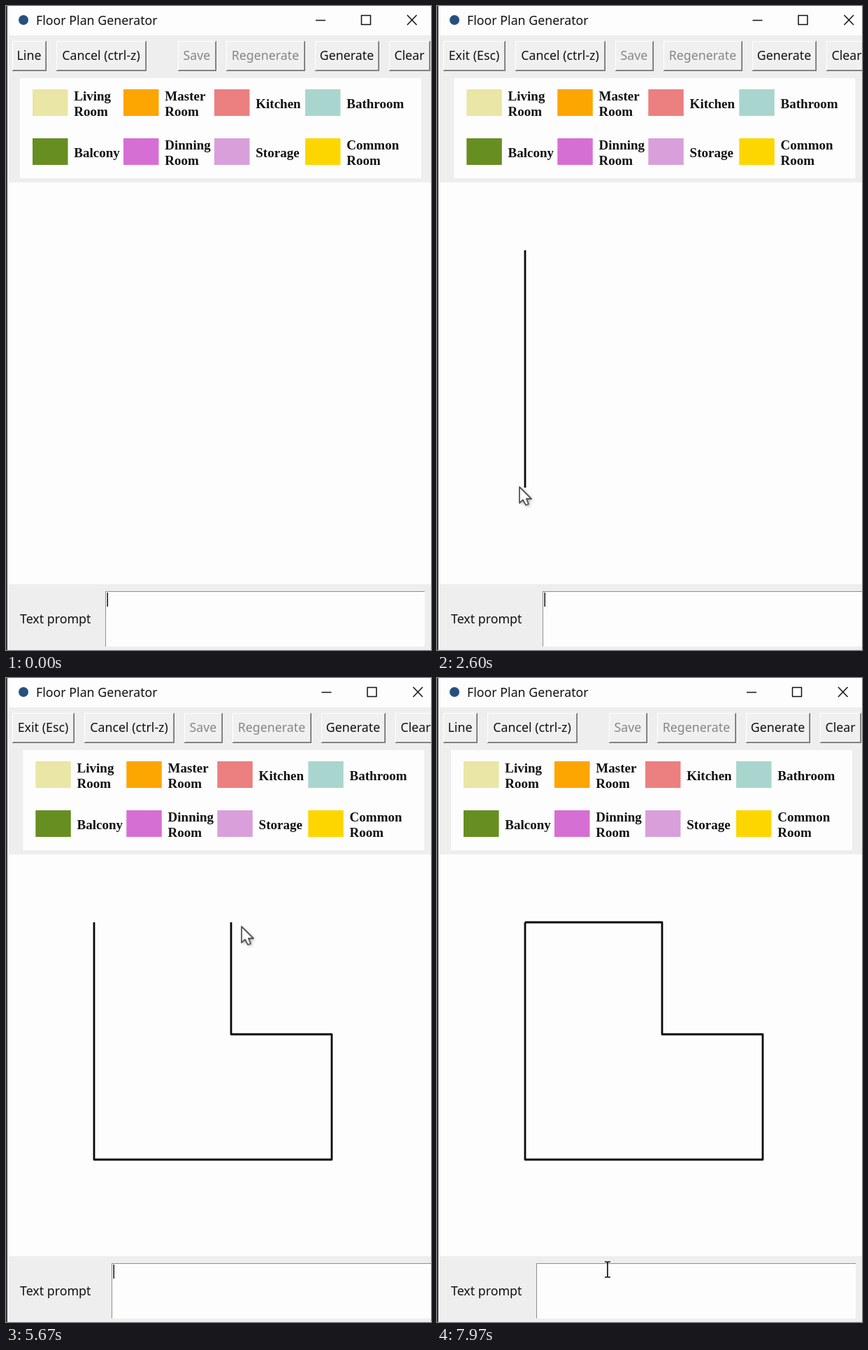
These frames come from a looping animation (608x920 px, 8000 ms). An HTML page with a canvas:

```html
<!DOCTYPE html>
<html lang="en">
<head>
<meta charset="utf-8">
<title>Floor Plan Generator</title>
<style>
html, body { margin: 0; width: 100%; height: 100%; overflow: hidden; background: #fdfdfd; }
canvas { display: block; }
</style>
</head>
<body>
<canvas id="stage" width="608" height="920"></canvas>
<script>
const ctx = document.getElementById('stage').getContext('2d');
const LOOP = 8000;
const UI = '17.8px "Noto Sans", "Open Sans", sans-serif';
const LABEL = 'bold 19px "Liberation Serif", "Times New Roman", serif';
const WHITE = '#fdfdfd', PANEL = '#eeeeef', INK = '#111';

// Drawing mode widens the window content
const DRAW_START = 900, DRAW_END = 7600;
const REST = 85, SNAP = 20;

// Pointer visits: time, x, y
const clicks = [
  [1450, 126, 347], [2570, 118, 687], [3370, 466, 687], [4040, 465, 508],
  [4790, 322, 508], [5640, 337, 355], [6680, 126, 351]
];
const visits = [
  [200, -30, 150], [830, 30, 70], ...clicks, [7400, 156, 373], [8000, 244, 845]
];

const legend = [
  ['#e9e6a6', 'Living', 'Room'], ['#fda500', 'Master', 'Room'],
  ['#ec7f80', 'Kitchen'], ['#a8d6ce', 'Bathroom'],
  ['#678e20', 'Balcony'], ['#d66fd4', 'Dinning', 'Room'],
  ['#d99fda', 'Storage'], ['#fdd600', 'Common', 'Room']
];

function rect(x, y, w, h, color) {
  ctx.fillStyle = color;
  ctx.fillRect(x, y, w, h);
}

function text(str, x, y, font, color = INK, align = 'left') {
  ctx.font = font;
  ctx.fillStyle = color;
  ctx.textAlign = align;
  ctx.fillText(str, x, y);
}

function path(points, width, color = INK) {
  ctx.beginPath();
  points.forEach(([x, y]) => ctx.lineTo(x, y));
  ctx.lineWidth = width;
  ctx.strokeStyle = color;
  ctx.stroke();
}

// Draws one button and returns where the next one starts
function button(label, x, w, disabled) {
  const y = 50, h = 43;
  rect(x, y, w, h, '#6c6c6c');
  rect(x, y, w - 1, h - 1, '#ffffff');
  rect(x + 1, y + 1, w - 2, h - 2, '#9b9b9b');
  rect(x + 1, y + 1, w - 3, h - 3, '#f0f0f0');
  text(label, x + w / 2 - 0.5, 77, UI, disabled ? '#868686' : INK, 'center');
  return x + w + 14;
}

function titleBar(shift) {
  ctx.fillStyle = '#28507d';
  ctx.beginPath();
  ctx.arc(25, 20, 7, 0, Math.PI * 2);
  ctx.fill();
  text('Floor Plan Generator', 43, 27, UI);
  ctx.save();
  ctx.translate(450 + shift, 20);
  path([[-7, 0.5], [7, 0.5]], 1.5);
  ctx.strokeRect(58.5, -6.5, 13, 13);
  for (const s of [-1, 1]) path([[124, -7 * s], [137.5, 7 * s]], 1.5);
  ctx.restore();
}

function toolbar(drawing) {
  let x = drawing ? button('Exit (Esc)', 9, 89) : button('Line', 9, 49);
  button('Cancel (ctrl-z)', x, 129);
  x = button('Save', drawing ? 255 : 246, 55, true);
  x = button('Regenerate', x, 113, true);
  x = button('Generate', x, 92);
  button('Clear', x, 59);
}

function drawLegend(left) {
  rect(left, 103, 574, 143, WHITE);
  legend.forEach(([color, ...lines], i) => {
    const x = left + 18 + (i % 4) * 130, y = i < 4 ? 119 : 189;
    rect(x, y, 50.5, 38, color);
    const top = lines.length > 1 ? y + 15.5 : y + 26.5;
    lines.forEach((line, n) => text(line, x + 59.3, top + n * 22.5, LABEL));
  });
}

function prompt(t, x) {
  rect(0, 826, 608, 94, PANEL);
  text('Text prompt', 20, 882, UI);
  rect(x, 836, 457, 79, '#8f8f8f');
  rect(x + 1, 837, 456, 78, WHITE);
  // Caret blinks with a 2:1 on/off ratio
  if ((t + 200) % 820 < 547) rect(x + 2.5, 838, 1.5, 20, INK);
}

// Eases between visits, resting briefly around each one
function pointerAt(t) {
  const i = visits.findIndex(v => v[0] > t);
  if (i <= 0) return visits[0].slice(1);
  const [t0, x0, y0] = visits[i - 1], [t1, x1, y1] = visits[i];
  const k = (t - t0 - REST) / (t1 - t0 - 2 * REST);
  const c = Math.min(1, Math.max(0, k)), e = c * c * (3 - 2 * c);
  return [x0 + (x1 - x0) * e, y0 + (y1 - y0) * e];
}

// Aligns a point with earlier corners that are close on either axis
function snap(point, corners) {
  return point.map((v, axis) => {
    const near = corners.find(c => Math.abs(c[axis] - v) < SNAP);
    return near ? near[axis] : v;
  });
}

const corners = [[126, 349]];
for (const [, x, y] of clicks.slice(1)) {
  // The lower right and inner corners follow the pointer's hot spot
  corners.push(snap([x, y + 1], corners));
}

function walls(t, mouse, drawing) {
  const done = corners.filter((c, i) => clicks[i][0] <= t);
  if (!done.length) return;
  ctx.lineJoin = 'round';
  path(done, 2.8, '#080808');
  if (!drawing) return;
  const from = done[done.length - 1], to = snap(mouse, done);
  const straight = from.some((v, axis) => v === to[axis]);
  ctx.setLineDash([5, 4]);
  path([from, to], straight ? 1.9 : 1.2);
  ctx.setLineDash([]);
}

function textPointer() {
  path([[0, -10], [0, 10]], 1.7);
  for (const sx of [-1, 1]) {
    for (const sy of [-1, 1]) path([[4 * sx, 11 * sy], [sx, 11 * sy], [0, 10 * sy]], 1.7);
  }
}

function arrowPointer() {
  const arrow = new Path2D('M0 0V23L5 18.5L9 26L13 24.5L9.8 17H17Z');
  ctx.save();
  ctx.shadowColor = 'rgba(0,0,0,.4)';
  ctx.shadowBlur = 4;
  ctx.shadowOffsetX = ctx.shadowOffsetY = 2;
  ctx.fillStyle = WHITE;
  ctx.fill(arrow);
  ctx.restore();
  ctx.lineWidth = 1.8;
  ctx.strokeStyle = '#555';
  ctx.stroke(arrow);
}

function draw(t) {
  const drawing = t >= DRAW_START && t < DRAW_END;
  const mouse = pointerAt(t);
  rect(0, 0, 608, 920, WHITE);
  titleBar(drawing ? 8.5 : 0);
  rect(0, 42, 608, 210, PANEL);
  toolbar(drawing);
  drawLegend(drawing ? 24.3 : 20);
  prompt(t, drawing ? 151 : 142);
  walls(t, mouse, drawing);
  rect(0, 0, 2, 920, '#3a3a3a');
  rect(2, 0, 1, 920, WHITE);
  ctx.save();
  ctx.translate(...mouse);
  if (mouse[1] > 836) textPointer();
  else arrowPointer();
  ctx.restore();
}

const start = performance.now();
function tick() {
  draw((performance.now() - start) % LOOP);
  requestAnimationFrame(tick);
}
draw(0);
requestAnimationFrame(tick);
</script>
</body>
</html>
```
